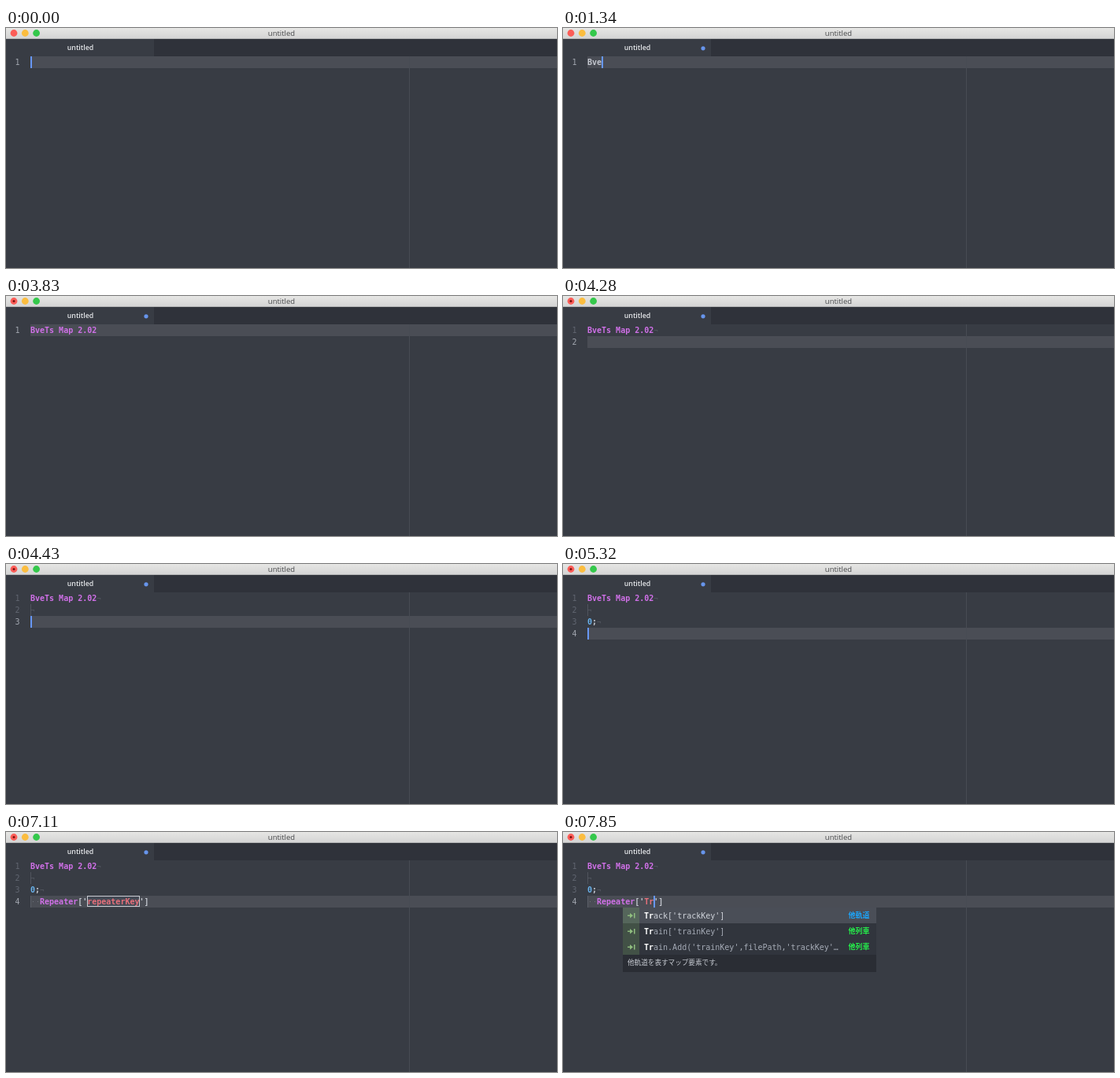
Write an HTML page with a canvas that moves like this. It is 700 px wide and 305 px high and loops after 8000 ms.

```html
<!DOCTYPE html>
<html lang="en">
<head>
<meta charset="utf-8">
<title>Editor autocomplete</title>
<style>
html, body { margin: 0; height: 100%; overflow: hidden; background: #383c44; }
canvas { display: block; }
</style>
</head>
<body>
<canvas id="stage" width="700" height="305"></canvas>
<script>
const ctx = document.getElementById('stage').getContext('2d');
const LOOP = 8000, LEFT = 31, TOP = 36, LINE = 15, CHAR = 6.02;
const MONO = '"DejaVu Sans Mono", monospace';
const SANS = '"Open Sans", "Noto Sans", sans-serif';
const CJK = '"Noto Sans CJK JP", "Noto Sans CJK", sans-serif';
const PURPLE = '#d070e8', RED = '#e8707b', BLUE = '#69b2ec', PLAIN = '#c3c7cf', FAINT = '#555a63';
const CARET = '#6797f5';

const HEAD = 'BveTs Map 2.02';
const BODY = HEAD + '\n\n0;\n';

const repeaterMenu = {
  col: 2, width: 277, note: '連続ストラクチャを表すマップ要素です。',
  rows: [["Repeater['repeaterKey']", '連続ストラクチャ', '#1ca5fb'],
         ['RollingNoise.Change(index)', '走行音', '#25ef4b']]
};
const trackMenu = {
  col: 12, width: 322, note: '他軌道を表すマップ要素です。',
  rows: [["Track['trackKey']", '他軌道', '#1ca5fb'],
         ["Train['trainKey']", '他列車', '#25ef4b'],
         ["Train.Add('trainKey',filePath,'trackKey'…", '他列車', '#25ef4b']]
};

// [start, buffer, menu, typed prefix]; "|" marks a visible caret
const steps = [
  [0, '|'], [300, ''], [600, 'B|'], [750, 'Bv|'], [1040, 'Bve|'],
  [1490, 'BveT|'], [1780, 'BveTs|'], [1930, 'BveTs |'],
  [2220, 'BveTs M|'], [2370, 'BveTs Ma|'], [2650, 'BveTs Map|'], [2800, 'BveTs Map |'],
  [3090, 'BveTs Map 2.|'], [3390, 'BveTs Map 2.0|'], [3540, HEAD + '|'], [3830, HEAD],
  [3980, HEAD + '\n|'], [4280, HEAD + '\n'], [4430, HEAD + '\n\n|'],
  [4730, HEAD + '\n\n0|'], [5030, HEAD + '\n\n0;|'], [5180, HEAD + '\n\n0;'],
  [5320, BODY + '|'], [5620, BODY + '  |'], [5920, BODY + '  R|'],
  [6060, BODY + '  R|', repeaterMenu, 'R'], [6360, BODY + '  Re|', repeaterMenu, 'Re'],
  [6660, BODY + "  Repeater['repeaterKey|']"], [7110, BODY + "  Repeater['repeaterKey']"],
  [7560, BODY + "  Repeater['T|']", trackMenu, 'T'],
  [7850, BODY + "  Repeater['Tr|']", trackMenu, 'Tr']
];

function rect(x, y, w, h, color) {
  ctx.fillStyle = color;
  ctx.fillRect(x, y, w, h);
}

function disc(x, y, r, color) {
  ctx.fillStyle = color;
  ctx.beginPath();
  ctx.arc(x, y, r, 0, 7);
  ctx.fill();
}

function text(str, x, y, color, font, align = 'left') {
  ctx.font = font;
  ctx.textAlign = align;
  ctx.fillStyle = color;
  ctx.fillText(str, x, y);
}

function drawWindow(t) {
  rect(0, 0, 700, 305, '#383c44');
  const bar = ctx.createLinearGradient(0, 0, 0, 14);
  bar.addColorStop(0, '#e6e6e4');
  bar.addColorStop(1, '#d3d3d3');
  rect(0, 0, 700, 14, bar);
  rect(0, 13, 700, 1, '#b4b5b6');
  ['#fb5d58', '#fbbd3f', '#34c84b'].forEach((c, i) => disc(10 + i * 14.3, 6.5, 4.4, c));
  text('untitled', 350, 10, '#48494b', '9.5px ' + SANS, 'center');
  rect(188, 14, 512, 22, '#2f323a');
  text('untitled', 94.5, 28, '#e6e8eb', '600 8.8px ' + SANS, 'center');
  if (t >= 1340) disc(178, 25.8, 2.6, '#6795ec');
  if (t >= 1640) disc(10, 6.5, 1.5, '#7a120f');
}

function drawCode(line, x, y) {
  const token = /BveTs Map 2\.02|Repeater|(?<=').*(?=')|^0/g;
  const put = (str, col, color) => text(str, x + col * CHAR, y, color, 'bold 10px ' + MONO);
  let end = 0;
  for (const m of line.matchAll(token)) {
    put(line.slice(end, m.index), end, PLAIN);
    put(m[0], m.index, m[0] === '0' ? BLUE : /^(BveTs|Repeater$)/.test(m[0]) ? PURPLE : RED);
    end = m.index + m[0].length;
  }
  put(line.slice(end), end, PLAIN);
}

function drawBuffer(buffer, t) {
  const lines = buffer.split('\n'), last = lines.length - 1;
  rect(LEFT, TOP + last * LINE, 700 - LEFT, LINE, '#4a4d55');
  rect(512, TOP, 1, 305 - TOP, '#484c54');
  lines.forEach((raw, i) => {
    const y = TOP + i * LINE, base = y + 10.5;
    const caret = raw.indexOf('|'), line = raw.replace('|', '');
    text(i + 1, 17.5, base, i === last ? '#a2a7b0' : '#616671', '10px ' + MONO, 'right');
    if (i < last) {
      if (!line) rect(LEFT, y, 1, LINE, '#50545d');
      text('¬', LEFT + line.length * CHAR, base, FAINT, '9px ' + MONO);
    }
    if (line.startsWith('  ')) {
      rect(LEFT, y, 1, LINE, '#5b5f68');
      for (const col of [0, 1]) rect(LEFT + 3 + col * 6, y + 7, 1, 1, '#70747d');
    }
    if (line.includes('repeaterKey') && t >= 6810) {
      rect(104, y, 66, 14, '#454a55');
      ctx.strokeStyle = '#c9ccd2';
      ctx.lineWidth = 1;
      ctx.strokeRect(103.5, y + .5, 66, 13);
    }
    drawCode(line, LEFT, base);
    if (caret >= 0) rect(LEFT + Math.round(caret * CHAR), y, 2, LINE, CARET);
  });
}

// Positions of the typed letters inside a suggestion
function matchedColumns(word, prefix) {
  let at = -1;
  return [...prefix].map(c => at = word.indexOf(c, at + 1));
}

function drawMenu({ col, width, note, rows }, prefix) {
  const wordX = LEFT + col * 6, x = wordX - 27, y = 96, bottom = y + rows.length * 20;
  rect(x, y, width, rows.length * 20, '#31353d');
  rect(x, bottom, width, 22, '#2a2d34');
  rows.forEach(([word, label, color], i) => {
    const top = y + i * 20, mid = top + 10, hits = matchedColumns(word, prefix);
    if (!i) rect(x, top, width, 20, '#4a4e57');
    rect(x, top, 21, 20, i ? '#425146' : '#55665b');
    rect(x + 6, mid - .5, 6, 1.4, '#8fbd7f');
    ctx.beginPath();
    ctx.moveTo(x + 9, mid - 3);
    ctx.lineTo(x + 13, mid + .2);
    ctx.lineTo(x + 9, mid + 3.4);
    ctx.fill();
    rect(x + 14, mid - 3, 1.5, 6.5, '#8fbd7f');
    [...word].forEach((c, k) => {
      const hit = hits.includes(k);
      text(c, wordX + k * CHAR, mid + 3.5, hit ? '#fff' : i ? '#a5abb6' : '#cfd3da',
        (hit ? 'bold ' : '') + '10px ' + MONO);
    });
    text(label, x + width - 8.5, mid + 3.3, color, 'bold 9px ' + CJK, 'right');
  });
  text(note, x + 6, bottom + 13.2, '#c6cad1', '500 8.6px ' + CJK);
}

function render(now) {
  const t = now % LOOP;
  const [, buffer, menu, prefix] = steps.findLast(s => s[0] <= t);
  drawWindow(t);
  drawBuffer(buffer, t);
  if (menu) drawMenu(menu, prefix);
}

const start = performance.now();
(function tick() {
  render(performance.now() - start);
  requestAnimationFrame(tick);
})();
</script>
</body>
</html>
```
